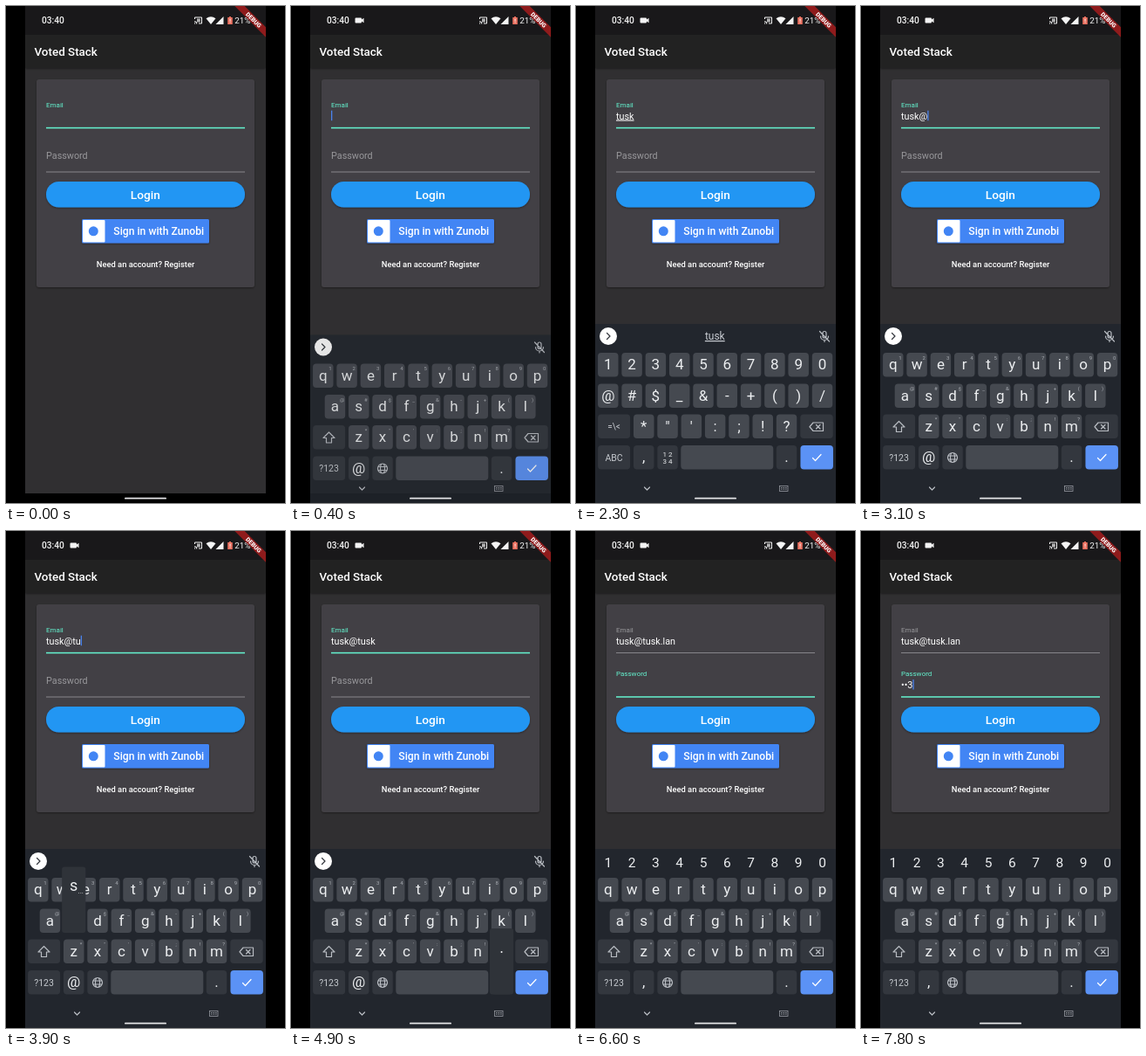
Recreate the animation shown at these times as an HTML page. Size 320x569 px, loop 8000 ms.

```html
<!DOCTYPE html>
<html lang="en">
<head>
<meta charset="utf-8">
<title>Login screen</title>
<style>
  html, body { margin: 0; width: 100%; height: 100%; overflow: hidden; background: #000; }
  svg { display: block; width: 100vw; height: 100vh; font-family: Roboto, sans-serif; }
  .medium { font-weight: 500; }
  .mid { text-anchor: middle; }
  .line { fill: none; stroke: #b9bdc3; stroke-width: 1.2; stroke-linejoin: round; stroke-linecap: round; }
</style>
</head>
<body>
<svg id="stage" viewBox="0 0 320 569">
  <defs>
    <clipPath id="screen"><rect x="22" width="276" height="569"/></clipPath>
    <filter id="shade" x="-10%" y="-10%" width="120%" height="125%">
      <feDropShadow dx="0" dy="1" stdDeviation="1" flood-color="#000" flood-opacity=".4"/>
    </filter>
  </defs>
  <rect width="320" height="569" fill="#000"/>
  <g clip-path="url(#screen)">
    <rect x="22" width="276" height="558" fill="#302f31"/>
    <rect x="22" width="276" height="71" fill="#212023" filter="url(#shade)"/>
    <rect x="22" width="276" height="33" fill="#19181a"/>
    <text class="medium" x="32.5" y="56.8" font-size="13.4" fill="#fff">Voted Stack</text>

    <g fill="#f4f4f4">
      <text class="medium" x="41" y="20.2" font-size="10.2">03:40</text>
      <path id="camera" d="M74.5 13.5h5.5q1 0 1 1v1l2.5-1.7v5.4l-2.5-1.7v1q0 1-1 1h-5.5q-1 0-1-1v-4q0-1 1-1z"/>
      <path d="M216.5 15v-2h8v7h-3.500" fill="none" stroke="#f4f4f4"/>
      <path d="M216 20.500v-1.200a1.200 1.200 0 0 1 1.200 1.200zM216 18.200v-1a3.300 3.300 0 0 1 3.300 3.300h-1a2.300 2.300 0 0 0-2.300-2.300z"/>
      <rect x="219" y="14.500" width="3.800" height="4" opacity=".7"/>
      <path d="M229.500 14.300q5.500-4 11 0l-5.500 6.700z"/>
      <path d="M249.500 12v9h-9z"/>
      <path d="M256 12h2v1h1.800v8h-5.600v-8h1.800z" fill="#e8705f"/>
      <path d="M256.600 14.500h.9v3h-.9zM256.600 18.300h.9v1h-.9z" fill="#fff"/>
      <text x="262.300" y="20" font-size="9.800">21%</text>
    </g>

    <rect x="35" y="84" width="250" height="238" rx="3" fill="#424144" filter="url(#shade)"/>
    <text id="emailLabel" x="46" y="116" font-size="8">Email</text>
    <text id="email" x="46" y="129.500" font-size="10.800" fill="#fff"></text>
    <rect id="emailLine" x="46" width="228"/>
    <text id="passLabel" x="46">Password</text>
    <text id="pass" x="46" y="180" font-size="10.800" fill="#fff"></text>
    <rect id="passLine" x="46" width="228"/>
    <rect id="cursor" width="1.300" height="11.500" fill="#4a83ee"/>

    <rect x="46" y="201" width="228" height="29.500" rx="14.750" fill="#2196f3" filter="url(#shade)"/>
    <g fill="#fff" class="medium">
      <text class="mid" x="159.800" y="221" font-size="13.700">Login</text>
      <rect x="87" y="244" width="146" height="27.500" rx="1.500" fill="#4285f4" filter="url(#shade)"/>
      <rect x="88" y="245" width="25.500" height="25.500" rx="1"/>
      <circle cx="100.300" cy="257.800" r="5.500" fill="#4285f4"/>
      <text x="123.300" y="262" font-size="12.200">Sign in with Zunobi</text>
      <text class="mid" x="160" y="298.500" font-size="9.400">Need an account? Register</text>
    </g>

    <g transform="translate(284 16) rotate(45)">
      <rect x="-40" y="-4" width="80" height="8" fill="#b71c1c" fill-opacity=".75"/>
      <text class="mid" y="2.400" font-size="6.800" font-weight="900" fill="#fff">DEBUG</text>
    </g>

    <g id="keyboard">
      <g id="panel">
        <rect x="22" y="364" width="276" height="320" fill="#22262d"/>
        <g id="bar">
          <circle cx="37" cy="378" r="10" fill="#fff"/>
          <path class="line" d="M35.500 374.500l3.500 3.500-3.500 3.500" style="stroke:#33373d"/>
          <text id="hint" class="mid" x="159.300" y="382" font-size="12" fill="#c9cdd3" text-decoration="underline"></text>
          <path class="line" d="M283 374.500a2 2 0 0 1 4 0v3.500a2 2 0 0 1-4 0zM280.500 378a4.500 4.500 0 0 0 9 0M285 382.500v2M279.500 372.500l11 11.500"/>
        </g>
      </g>
      <path class="line" d="M78.500 551l3 3 3-3"/>
      <rect x="233.500" y="549.500" width="9.500" height="6" fill="none" stroke="#969aa1" stroke-width=".8"/>
      <path d="M235 551.500h7M235 553.200h7" stroke="#969aa1" stroke-dasharray="1 .6"/>
    </g>
    <rect x="136" y="562.800" width="48" height="1.800" rx=".9" fill="#e4e4e6"/>
  </g>
</svg>
<script>
const LOOP = 8000, PITCH = 27.3, KEY_W = 23.5, KEY_H = 27.5;
const ROW_TOP = [397, 432.4, 467.6, 503];
const COLOR = { key: '#454950', side: '#33373e', enter: '#5b92f5', ink: '#eceef0', teal: '#64f2cf', muted: '#98979b' };
const $ = id => document.getElementById(id);

function add(parent, tag, attrs, text) {
  const node = document.createElementNS('http://www.w3.org/2000/svg', tag);
  set(node, attrs);
  if (text) node.textContent = text;
  return parent.appendChild(node);
}
function set(node, attrs) {
  for (const name in attrs) node.setAttribute(name, attrs[name]);
}
const show = (node, on) => set(node, { visibility: on ? 'visible' : 'hidden' });

const keyPos = {};
const column = i => 36.8 + PITCH * i;

function cap(parent, x, row, width, fill) {
  add(parent, 'rect', { x: x - width / 2, y: ROW_TOP[row], width, height: KEY_H, rx: 4, fill });
}
function label(parent, x, y, size, text, fill = COLOR.ink) {
  return add(parent, 'text', { x, y, 'font-size': size, fill, class: 'mid' }, text);
}
function key(parent, x, row, char, corner, fill = COLOR.key) {
  cap(parent, x, row, KEY_W, fill);
  label(parent, x, ROW_TOP[row] + 19.3, 17, char);
  if (corner) label(parent, x + 8.2, ROW_TOP[row] + 7.8, 6, corner, '#a9adb3');
}
const icon = (parent, d) => add(parent, 'path', { d, class: 'line' });

function layout(rows, corners, comma, symbols) {
  const g = add($('panel'), 'g', {});
  rows.forEach((chars, row) => {
    const first = row === 2 ? column(1.5) : chars.length < 10 ? column(.5) : column(0);
    [...chars].forEach((char, i) => {
      const x = first + PITCH * i;
      key(g, x, row, char, corners[row][i]);
      if (!symbols) keyPos[char] = [x, row];
    });
  });
  cap(g, 43.6, 2, 37, COLOR.side);
  cap(g, 276, 2, 37.5, COLOR.side);
  cap(g, 43.6, 3, 37, COLOR.side);
  cap(g, column(2.5), 3, KEY_W, COLOR.side);
  cap(g, 173.3, 3, 106, COLOR.key);
  cap(g, 276.2, 3, 37.5, COLOR.enter);
  key(g, column(1.5), 3, comma, '', COLOR.side);
  key(g, column(7.5), 3, '.', '', COLOR.side);
  icon(g, 'M272 477h11.500v9.500h-11.500l-4-4.750zM275.500 479.500l4.500 4.500M280 479.500l-4.500 4.500');
  icon(g, 'M271.500 517.500l3 3 6.500-7').style.stroke = '#fff';
  if (symbols) {
    label(g, 43.6, 485, 10, '=\\<', '#c5c9ce');
    label(g, 43.6, 520.7, 10.5, 'ABC', '#c5c9ce');
    label(g, column(2.5), 515.5, 8, '1 2');
    label(g, column(2.5), 524, 8, '3 4');
  } else {
    icon(g, 'M43.500 475.500l-6.500 6.500h3.500v5.500h6v-5.500h3.500z');
    label(g, 43.6, 520.7, 10.5, '?123', '#c5c9ce');
    icon(g, 'M99.500 517a5.500 5.500 0 1 0 11 0a5.500 5.500 0 1 0-11 0M102.500 517a2.500 5.500 0 1 0 5 0a2.500 5.500 0 1 0-5 0M100 515h10M100 519h10');
  }
  return g;
}

const LETTERS = ['qwertyuiop', 'asdfghjkl', 'zxcvbnm'];
const SIGNS = ['@#$_&-+()', '*"\':;!?'];
const emailKeys = layout(LETTERS, ['1234567890', ...SIGNS], '@');
const passKeys = layout(LETTERS, ['', ...SIGNS], ',');
const symbolKeys = layout(['1234567890', '@#$_&-+()/', '*"\':;!?'], ['', '', ''], ',', true);
keyPos['.'] = [column(7.5), 3];

const digitPress = add(passKeys, 'rect', { y: 366, width: KEY_W, height: 26, rx: 4, fill: '#454950' });
[...'1234567890'].forEach((d, i) => label(passKeys, column(i), 384.5, 15.5, d));

const popup = add($('panel'), 'g', {});
add(popup, 'rect', { x: -13.6, y: -48, width: 27.2, height: 75.5, rx: 3, fill: '#2f3339' });
const popupChar = label(popup, 0, -20, 18, 's');
const popupDots = label(popup, 8, -17, 8, '...');

// Each key stroke: pressed at, committed at, character.
const emailStrokes = [
  [1200, 1300, 't'], [1300, 1400, 'u'], [1500, 1600, 's'], [1700, 1800, 'k'], [2800, 2800, '@'],
  [3700, 3800, 't'], [3800, 3900, 'u'], [3900, 4000, 's'], [4100, 4200, 'k'],
  [4900, 5000, '.'], [5100, 5200, 'l'], [5300, 5500, 'a'], [5500, 5600, 'n']
];
const passStrokes = [[7000, 7100, '1'], [7300, 7400, '2'], [7600, 7800, '3']];

const typed = (strokes, t) => strokes.filter(s => s[1] <= t).map(s => s[2]).join('');
const held = (strokes, t) => strokes.find(s => s[0] <= t && t < s[1]);
const lastCommit = (strokes, t, start) => strokes.reduce((last, s) => s[1] <= t ? s[1] : last, start);
const clamp = v => Math.min(1, Math.max(0, v));

function underline(node, y, focused) {
  set(node, { y: focused ? y - .8 : y - .4, height: focused ? 1.5 : .8, fill: focused ? COLOR.teal : COLOR.muted });
}

function draw(t) {
  const onPass = t >= 6100;
  const onSymbols = t >= 2000 && t < 3000;
  show($('camera'), t >= 100);

  const rest = (1 - clamp((t - 200) / 400)) ** 3;
  set($('keyboard'), { opacity: 1 - rest });
  set($('panel'), { transform: `translate(0 ${100 * rest})` });
  show(emailKeys, !onPass && !onSymbols);
  show(symbolKeys, onSymbols);
  show(passKeys, onPass);
  show($('bar'), !onPass);

  const email = typed(emailStrokes, t);
  $('email').textContent = email;
  set($('email'), { 'text-decoration': email.length < 5 ? 'underline' : 'none' });
  $('hint').textContent = t < 2800 ? typed(emailStrokes, t - 100) : '';
  set($('emailLabel'), { fill: onPass ? COLOR.muted : COLOR.teal });
  underline($('emailLine'), 139.6, !onPass);

  const lift = 1 - (1 - clamp((t - 6050) / 200)) ** 2;
  const secret = typed(passStrokes, t);
  $('pass').textContent = '•'.repeat(Math.max(0, secret.length - 1)) + secret.slice(-1);
  set($('passLabel'), { y: 174.5 - 8.5 * lift, 'font-size': 10.8 - 2.8 * lift, fill: onPass ? COLOR.teal : COLOR.muted });
  underline($('passLine'), 190, onPass);

  const since = t - (onPass ? lastCommit(passStrokes, t, 6100) : lastCommit(emailStrokes, t, 400));
  show($('cursor'), since >= 0 && since % 1000 < 500);
  set($('cursor'), {
    x: 46 + $(onPass ? 'pass' : 'email').getComputedTextLength(),
    y: onPass ? 170 : 119.7
  });

  const stroke = held(emailStrokes, t);
  show(popup, stroke);
  if (stroke) {
    const [x, row] = keyPos[stroke[2]];
    set(popup, { transform: `translate(${x} ${ROW_TOP[row]})` });
    popupChar.textContent = stroke[2];
    popupDots.textContent = row < 3 ? '...' : '';
  }
  const digit = held(passStrokes, t);
  show(digitPress, digit);
  if (digit) set(digitPress, { x: column(digit[2] - 1) - KEY_W / 2 });
}

const start = performance.now();
function tick() {
  const t = (performance.now() - start) % LOOP;
  draw(Math.floor(t / 100) * 100);
  requestAnimationFrame(tick);
}
tick();
</script>
</body>
</html>
```
